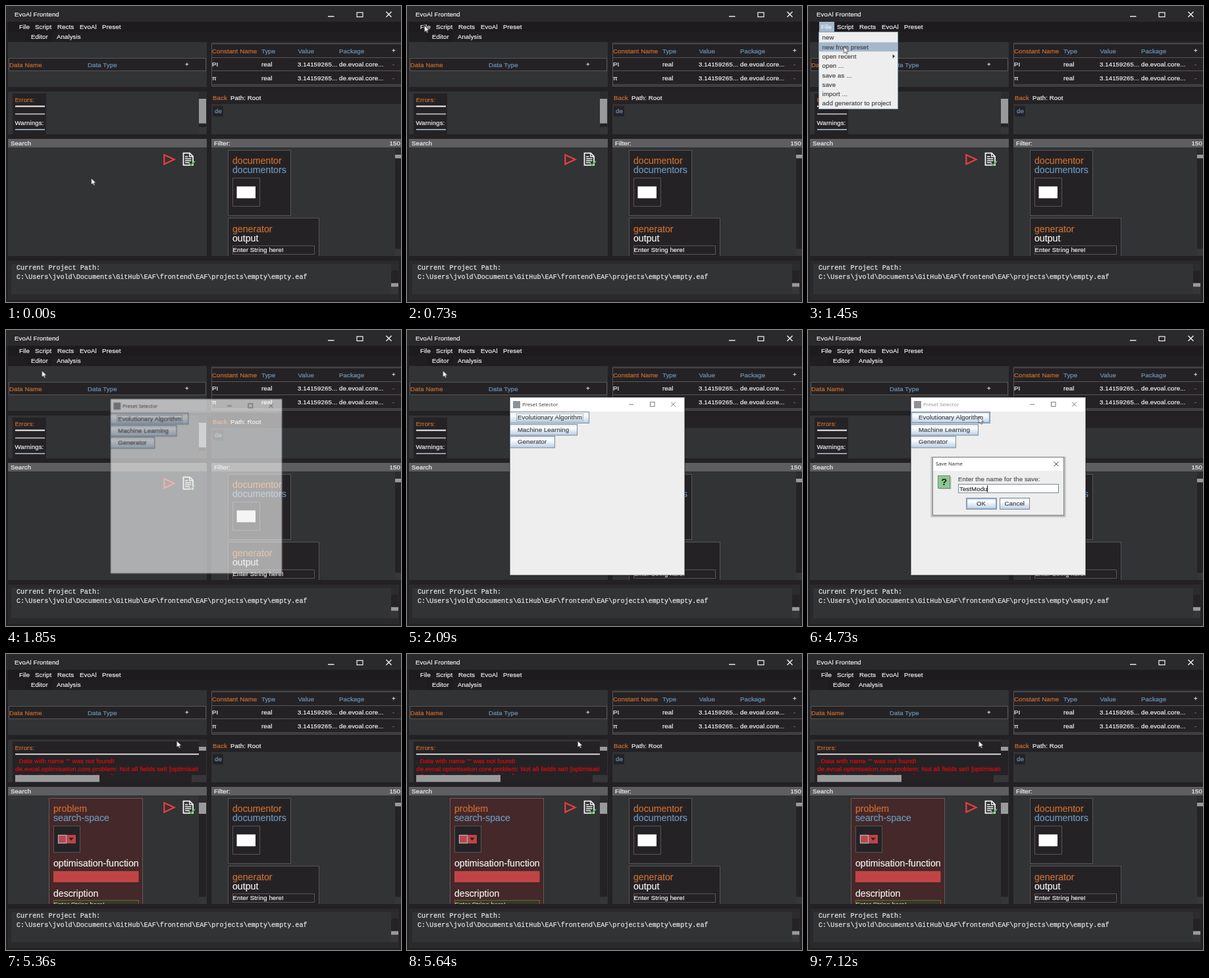
Write an HTML page that moves like this. It is 600 px wide and 450 px high and loops after 7210 ms.

```html
<!DOCTYPE html>
<html lang="en">
<head>
<meta charset="utf-8">
<title>EvoAl Frontend</title>
<style>
  html, body { margin: 0; width: 100%; height: 100%; overflow: hidden; background: #232123; }
  svg { display: block; width: 600px; height: 450px; }
  text { font: 9.6px "Liberation Sans", Arial, sans-serif; letter-spacing: .12px; white-space: pre; stroke-width: .2px; }
  .big { font-size: 14.15px; letter-spacing: 0; }
  .mono { font: 10.08px "Liberation Mono", "Courier New", monospace; letter-spacing: 0; }
  .win { font: 7.8px "Open Sans", sans-serif; letter-spacing: 0; stroke-width: 0; }

  /* 1% of the loop is 72.1 ms */
  .anim { animation: 7210ms linear infinite both; }
  #cursor { animation-name: move; animation-timing-function: ease-in-out; }
  #menu { animation-name: menu; animation-timing-function: step-end; }
  #hover { animation-name: hover; animation-timing-function: step-end; }
  #preset { animation-name: preset; transform-origin: 288.5px 237px; }
  #save { animation-name: save; transform-origin: 289px 238px; }
  #empty { animation-name: before; animation-timing-function: step-end; }
  #loaded { animation-name: after; animation-timing-function: step-end; }
  #caption { animation-name: dim; animation-timing-function: step-end; }
  #press { animation-name: press; animation-timing-function: step-end; }
  #focus { animation-name: focus; animation-timing-function: step-end; }

  @keyframes move {
    0%, .83% { transform: translate(129.5px, 261.7px); }
    9.4%, 11.8% { transform: translate(26.5px, 29.7px); }
    17.5%, 31.6% { transform: translate(54.5px, 61.7px); }
    36.6%, 100% { transform: translate(259.3px, 132px); }
  }
  @keyframes menu { 0%, 21.22% { visibility: hidden; } 10.96% { visibility: visible; } }
  @keyframes hover {
    0% { opacity: 0; }
    13.9% { opacity: 1; transform: translateY(-14.3px); }
    15.7%, 100% { opacity: 1; transform: none; }
  }
  @keyframes preset {
    0%, 24.15% { opacity: 0; transform: scale(.948); }
    26.45%, 72.12% { opacity: 1; transform: none; }
    73.5%, 100% { opacity: 0; transform: scale(.948); }
  }
  @keyframes save {
    0%, 38.56% { opacity: 0; transform: scale(.96); }
    39.39%, 70.46% { opacity: 1; transform: none; }
    71.57%, 100% { opacity: 0; transform: scale(.96); }
  }
  @keyframes before { 0% { visibility: visible; } 73.93%, 100% { visibility: hidden; } }
  @keyframes after { 0% { visibility: hidden; } 73.93%, 100% { visibility: visible; } }
  @keyframes dim { 0% { fill: #333; } 38.56%, 71.57% { fill: #909090; } }
  @keyframes press { 0% { opacity: 0; } 36.1%, 100% { opacity: 1; } }
  @keyframes focus { 0% { opacity: 1; } 38.56%, 100% { opacity: 0; } }
</style>
</head>
<body>
<svg id="stage" viewBox="0 0 600 450" xmlns="http://www.w3.org/2000/svg"></svg>
<script>
const LOOP = 7210;
const C = {
  back: '#232123', title: '#2a292b', menu: '#1e1b1e', panel: '#313335', dark: '#252225',
  line: '#555557', bar: '#5e5e60', thumb: '#999a9b', orange: '#cb6f2e', blue: '#6c97bd',
  white: '#f4f4f4', red: '#c04446', metal: '#7a8a99', ink: '#45454a'
};

const rect = (x, y, w, h, fill, stroke = 'none', sw = 1, more = '') =>
  `<rect x="${x}" y="${y}" width="${w}" height="${h}" fill="${fill}" stroke="${stroke}" stroke-width="${sw}" ${more}/>`;
const box = (x, y, w, h, fill, stroke) => rect(x + .5, y + .5, w - 1, h - 1, fill, stroke);
const text = (x, y, s, fill = C.white, cls = '', more = '') =>
  `<text x="${x}" y="${y}" fill="${fill}" stroke="${fill}" class="${cls}" ${more}>${s}</text>`;
const path = (d, stroke, sw = 1, fill = 'none') =>
  `<path d="${d}" stroke="${stroke}" stroke-width="${sw}" fill="${fill}"/>`;
const group = (id, body) => `<g id="${id}" class="anim">${body}</g>`;
const clip = (id, body) => `<g clip-path="url(#${id})">${body}</g>`;
const clipRect = (id, x, y, w, h) => `<clipPath id="${id}">${rect(x, y, w, h, '#000')}</clipPath>`;

function scrollbar(x, y, w, h, top, size) {
  return rect(x, y, w, h, C.dark) + rect(x, y, w, 10.5, '#2c2b2d') +
    rect(x, y + h - 11, w, 11, '#363638') + rect(x, top, w, size, C.thumb);
}

function button(x, y, w, h, tx, label) {
  return box(x, y, w, h, 'url(#metal)', C.metal) + text(tx, y + h / 2 + 3.2, label, C.ink);
}

function closeMark(x, y, r, color, sw = 1) {
  return path(`M${x - r} ${y - r}l${2 * r} ${2 * r}m0 ${-2 * r}l${-2 * r} ${2 * r}`, color, sw);
}

function chrome() {
  const menus = [[20, 'File'], [44, 'Script'], [78, 'Rects'], [112, 'EvoAl'], [146, 'Preset']];
  return rect(0, 0, 600, 450, C.back) + rect(0, 0, 600, 24, C.title) +
    rect(3, 24, 597, 15, C.menu) + rect(3, 39, 597, 15, '#201e20') +
    rect(30, 39, 40, 15, C.menu) +
    text(13, 16.2, 'EvoAl Frontend') +
    path('M489 15.8h9.5', C.white, 1.4) + rect(533, 9.9, 9, 6.6, 'none', C.white, 1.2) +
    closeMark(581.5, 12.7, 4, C.white, 1.4) +
    menus.map(([x, s]) => text(x, 34.8, s)).join('') +
    text(38, 50.4, 'Editor') + text(77, 50.4, 'Analysis');
}

function tables() {
  const row = (y, name) => text(313, y, name) + text(388, y, 'real') +
    text(443, y, '3.14159265...') + text(506, y, 'de.evoal.core...') + text(587, y, '-', '#9a6a4a');
  return rect(3, 55, 302, 68, C.panel) + box(4, 79, 300, 20, C.dark, C.line) +
    text(5, 92.5, 'Data Name', C.orange) + text(124, 92.5, 'Data Type', C.blue) + text(272, 92, '+') +
    rect(312, 55, 288, 68, C.panel) + box(312, 57, 290, 65, C.dark, C.line) +
    path('M312 78.5h288M312 98.5h288M312 119.5h288', C.line) +
    text(313, 71.5, 'Constant Name', C.orange) + text(388, 71.5, 'Type', C.blue) +
    text(443.5, 71.5, 'Value', C.blue) + text(506, 71.5, 'Package', C.blue) + text(586, 71.3, '+') +
    row(91.5, 'PI') + row(112.5, 'π');
}

function sidePanels() {
  return rect(3, 130, 302, 65, C.panel) + rect(312, 130, 288, 65, C.panel) +
    rect(312, 130, 288, 19, C.dark) + text(314, 142.7, 'Back', C.orange) +
    text(341, 142.7, 'Path: Root') + rect(314, 152, 16, 16, C.dark) + text(317, 163, 'de', C.blue) +
    rect(3, 202, 302, 178, C.panel) + rect(3, 202, 302, 13, C.bar) + text(7, 212, 'Search') +
    rect(312, 202, 288, 178, C.panel) + rect(312, 202, 288, 13, C.bar) +
    text(316, 212, 'Filter:') + text(582.5, 212, '150');
}

function library() {
  return clip('lower',
    box(337, 219, 96, 100, C.dark, C.line) +
    text(344, 240, 'documentor', C.orange, 'big') + text(344, 253.7, 'documentors', C.blue, 'big') +
    box(344, 261, 42, 44, C.dark, C.line) + rect(350.5, 274.3, 28.5, 18, '#fff') +
    box(337, 322, 139, 70, C.dark, C.line) +
    text(344, 344, 'generator', C.orange, 'big') + text(344, 357.7, 'output', C.white, 'big') +
    box(344, 364, 125, 14, C.dark, C.line) + text(344.5, 374.3, 'Enter String here!') +
    scrollbar(591, 215, 9, 165, 226, 5.5));
}

function consolePane() {
  return rect(3, 387, 594, 60, C.title) + rect(8, 392, 577, 46, C.panel) +
    scrollbar(585, 392, 11, 46, 421.3, 5.5) +
    text(16, 401, 'Current Project Path:', '#ededed', 'mono') +
    text(16, 414.6, 'C:\\Users\\jvold\\Documents\\GitHub\\EAF\\frontend\\EAF\\projects\\empty\\empty.eaf', '#ededed', 'mono');
}

function emptyLog() {
  return rect(10, 133, 51, 62, C.dark) + text(13.5, 145.8, 'Errors:', C.orange) +
    rect(14, 151.5, 45, 2, C.white) + rect(14, 163.2, 45, 2, '#a9a9aa') +
    text(13.5, 181, 'Warnings:') + rect(14, 187, 45, 1.6, '#a9bccd') +
    scrollbar(293, 130, 11, 65, 141, 37.5);
}

function loadedLog() {
  const missing = '. Data with name "" was not found!';
  return clip('log',
    rect(10, 133, 284, 62, C.dark) + text(13.5, 145.8, 'Errors:', C.orange) +
    rect(14, 151.5, 280, 1.7, C.white) +
    text(14, 165.5, missing, '#e60a0a') +
    text(14, 177.7, 'de.evoal.optimisation.core.problem: Not all fields set! [optimisation-function]', '#e60a0a') +
    text(14, 188.6, missing, '#e60a0a')) +
    rect(10, 184, 283, 11, C.dark) + rect(14, 184, 128, 10.5, C.thumb) + rect(282, 184, 11, 11, '#363638') +
    scrollbar(293, 130, 11, 65, 141, 6);
}

function problemCard() {
  return clip('lower',
    box(65, 219, 143, 175, '#452829', '#69595a') +
    text(72, 240.3, 'problem', C.orange, 'big') + text(72, 253.8, 'search-space', C.blue, 'big') +
    box(72, 261, 41, 41, C.dark, C.line) + rect(79, 275, 27, 13, C.red) +
    rect(79.5, 275.5, 12, 12, C.red, '#9db4c8', 1.3) + path('M95 279.2h8l-4 4.5z', 'none', 0, '#3a2224') +
    text(72, 323, 'optimisation-function', C.white, 'big') + rect(72, 330, 129.5, 17, C.red) +
    text(72, 368.5, 'description', C.white, 'big') +
    box(72, 374, 130, 14, '#393a25', '#66664a') + text(72.5, 384.3, 'Enter String here!', '#dcdcae') +
    scrollbar(293, 215, 11, 165, 226, 17));
}

function toolIcons() {
  return path('M240.3 226.3L255.5 233.3L240.3 240.5z', '#ee3c3c', 2.2) +
    path('M269.5 223.7h9.5l5 5v13.2h-14.5z', C.white, 1.8) + path('M278.7 224v5h5', C.white, 1.4) +
    path('M272 229h4.5M272 232.2h9.5M272 235.2h9.5M272 238.2h7', C.white, 1.4) +
    path('M277.8 239l3.2 3L286.8 236', '#57b657', 2);
}

function fileMenu() {
  const items = ['new', 'new from preset', 'open recent', 'open ...', 'save as ...', 'save',
    'import ...', 'add generator to project'];
  return rect(17, 24, 23, 15, '#a3b8cc') + text(20, 34.8, 'File') +
    box(16, 39, 121, 118, '#eee', '#8a9db3') +
    group('hover', rect(17, 55.2, 119, 14, '#a3b8cc')) +
    items.map((s, i) => text(21.5, 51.3 + i * 14.3, s, C.ink)).join('') +
    path('M128.7 73.5v6l3.4-3z', 'none', 0, '#333');
}

function presetWindow() {
  return rect(155, 101, 268, 273, '#000', 'none', 0, 'opacity=".25"') +
    box(156, 102, 266, 271, '#eee', '#8c8c8c') + rect(157, 103, 264, 21, '#fff') +
    rect(161, 108, 11, 11, '#8c9298') +
    text(175, 116, 'Preset Selector', '#333', 'win anim', 'id="caption"') +
    path('M337 113.2h7', '#777') + rect(369.5, 109.7, 6.5, 6.5, 'none', '#777') + closeMark(404.5, 113, 3.3, '#777') +
    button(156, 124, 121, 18, 168, 'Evolutionary Algorithm') +
    group('focus', rect(166.5, 127.5, 101, 11, 'none', '#a3b8cc')) +
    group('press', rect(157.5, 125.5, 118, 15, 'none', '#94b0d0', 1.5)) +
    button(156, 143, 103, 17.5, 168, 'Machine Learning') +
    button(156, 161, 69, 18.5, 168, 'Generator');
}

function saveWindow() {
  return rect(186, 192, 206, 93, '#000', 'none', 0, 'opacity=".1"') +
    rect(187.5, 193, 203, 91, '#000', 'none', 0, 'opacity=".13"') +
    box(189, 193, 200, 89, '#eee', '#858585') + rect(190, 194, 198, 20, '#fff') +
    text(194, 206.3, 'Save Name', '#222', 'win') + closeMark(377, 203.7, 3.3, '#333') +
    rect(199, 223, 18.5, 19, '#bbb') + box(197, 221, 19, 20, '#8fc796', '#5f9a68') +
    text(202.4, 235.6, '?', '#182818', '', 'style="font-size:14px;font-weight:bold"') +
    text(228, 229.5, 'Enter the name for the save:', '#55555b') +
    box(228, 234, 153, 14, '#fff', C.metal) +
    text(230, 244.6, '', '#333', '', 'id="entry"') +
    `<rect id="caret" y="236" width="1.1" height="10.5" fill="#222"/>` +
    button(240, 255, 47, 18, 256, 'OK') + rect(241.5, 256.5, 44, 15, 'none', '#94b0d0', 1.5) +
    button(291, 255, 46, 18, 298.5, 'Cancel');
}

const pointer = path('M0 0V10L2.4 7.9L4 11.3L5.6 10.5L4.1 7.2H7.2z', '#222', .7, '#fff');

document.getElementById('stage').innerHTML =
  `<defs><linearGradient id="metal" x2="0" y2="1">
     <stop offset="0" stop-color="#dde8f3"/><stop offset=".3" stop-color="#fff"/>
     <stop offset="1" stop-color="#b8cfe5"/></linearGradient>
     ${clipRect('lower', 3, 215, 597, 165)}${clipRect('log', 4, 130, 290, 65)}</defs>` +
  chrome() + tables() + sidePanels() + library() + consolePane() +
  group('empty', emptyLog()) + group('loaded', loadedLog() + problemCard()) + toolIcons() +
  group('menu', fileMenu()) + group('preset', presetWindow()) + group('save', saveWindow()) +
  group('cursor', pointer);

// Typed entry and its blinking caret
const WORD = 'TestModule';
const keyTimes = [...WORD].map((_, i) => i < 8 ? 3850 + i * 100 : 4000 + i * 100);
const entry = document.getElementById('entry');
const caret = document.getElementById('caret');

function draw(now) {
  const t = now % LOOP;
  const typed = keyTimes.filter(k => k <= t);
  const value = WORD.slice(0, typed.length);
  if (entry.textContent !== value) entry.textContent = value;
  const width = value ? entry.getComputedTextLength() : 0;
  const since = t - (typed.length ? typed[typed.length - 1] : 2780);
  caret.setAttribute('x', 229.4 + width);
  caret.setAttribute('opacity', since >= 0 && since % 1000 < 500 ? 1 : 0);
  requestAnimationFrame(draw);
}
requestAnimationFrame(draw);
</script>
</body>
</html>
```
